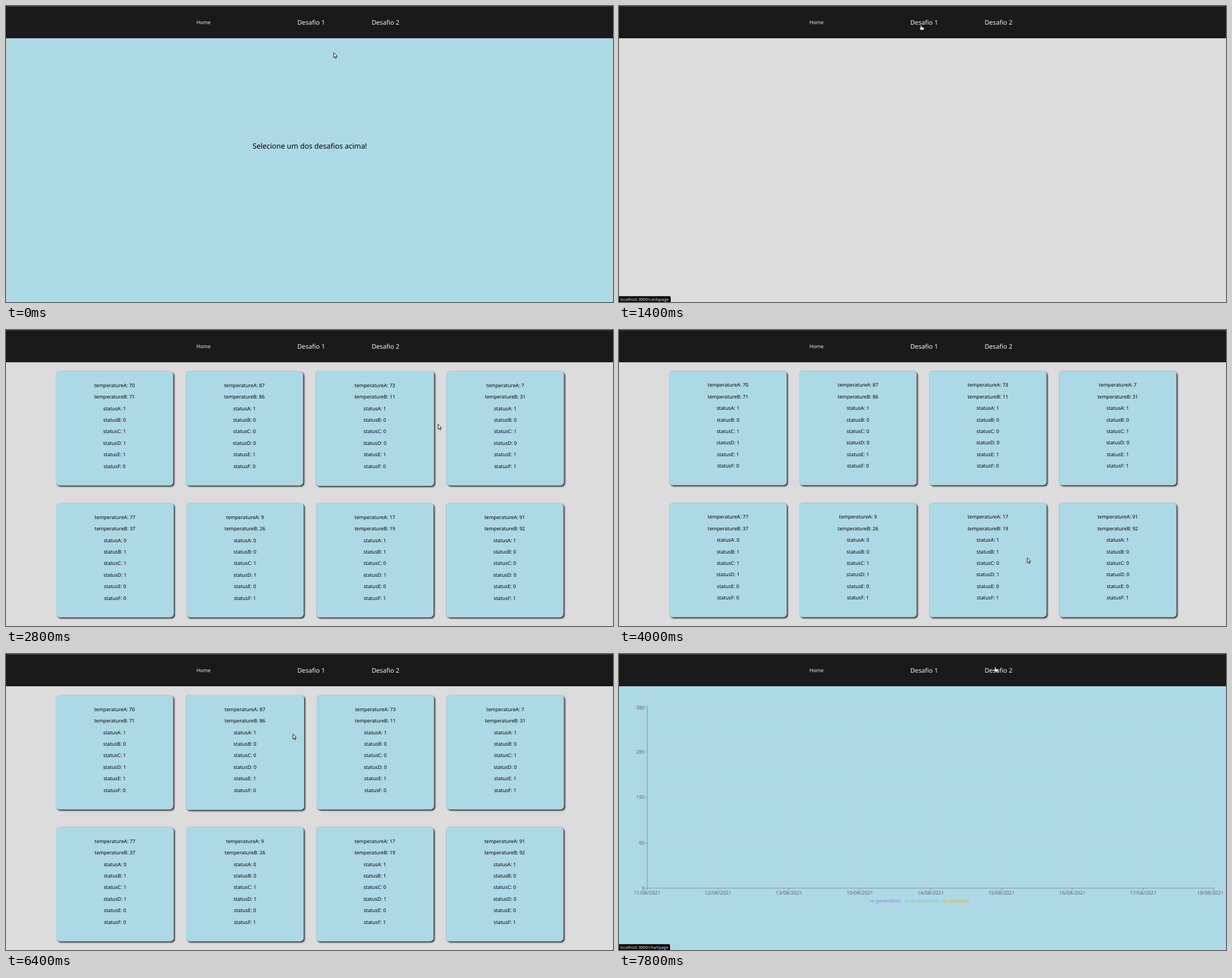
An HTML page that plays this animation: 1071 by 523 pixels, repeating every 8 s.

```html
<!DOCTYPE html>
<html lang="pt">
<head>
<meta charset="utf-8">
<title>Desafios</title>
<style>
  html, body { margin: 0; width: 100%; height: 100%; overflow: hidden; background: #add8e6; }
  svg { display: block; width: 100%; height: 100%; }
  text { font-family: "Noto Sans", "Open Sans", sans-serif; text-rendering: geometricPrecision; white-space: pre; }
  .mid { text-anchor: middle; }
  .end { text-anchor: end; }
  .nav { fill: #f4f4f4; }
  .card rect { fill: #add8e6; filter: drop-shadow(0 0 .5px rgba(0, 0, 0, .45)) drop-shadow(2px 2px 1.2px rgba(0, 0, 0, .75)); }
  .card text { font-size: 8.7px; }
  .tick { font-size: 8.83px; fill: #666; }
  .axis { stroke: #666; stroke-width: .6; fill: none; }
  .grid { stroke: #ccc; stroke-width: .5; stroke-dasharray: 1.7 1.7; opacity: .4; fill: none; }
  .legend { font-size: 8.6px; }
</style>
</head>
<body>
<svg id="stage" viewBox="0 0 1071 523"></svg>
<script>
const LOOP = 8000, STEP = 100, HOVER_LAG = 200;
const stage = document.getElementById('stage');

function add(parent, tag, attrs = {}, text) {
  const el = document.createElementNS('http://www.w3.org/2000/svg', tag);
  set(el, attrs);
  if (text !== undefined) el.textContent = text;
  parent.append(el);
  return el;
}
function set(el, attrs) { for (const k in attrs) el.setAttribute(k, attrs[k]); }
function show(el, on) { el.style.display = on ? '' : 'none'; }
const clamp = v => Math.max(0, Math.min(1, v));

const back = add(stage, 'rect', { width: 1071, height: 523 });

// Home page
const home = add(stage, 'text', { class: 'mid', x: 536, y: 251.6, 'font-size': 12.86 },
  'Selecione um dos desafios acima!');

// Cards page: two temperatures, then one flag per status A to F
const READINGS = [
  '70 71 101110', '87 86 100010', '73 11 100010', '7 31 101011',
  '77 37 011100', '9 26 001101', '17 19 110101', '91 92 100001'
];
const CARD_W = 207.2, CARD_H = 202, GROW_X = 1.8, GROW_Y = 1.6;
const cardPage = add(stage, 'g');
const cards = READINGS.map((reading, i) => {
  const g = add(cardPage, 'g', { class: 'card' });
  const box = add(g, 'rect', { rx: 6 });
  const [a, b, flags] = reading.split(' ');
  const lines = [`temperatureA: ${a}`, `temperatureB: ${b}`,
    ...[...flags].map((flag, k) => `status${'ABCDEF'[k]}: ${flag}`)];
  lines.forEach((line, k) => add(g, 'text', { class: 'mid', y: k * 20.42 - 73 }, line));
  return { g, box, col: i % 4, row: i >> 2, x: 192.4 + (i % 4) * 229.2, y: 173.3 + (i >> 2) * 233.1 };
});

// Chart page
const chartPage = add(stage, 'g');
const plot = add(chartPage, 'g');
const X0 = 49.8, X1 = 1050, Y0 = 92.8, Y1 = 413.8;
const DX = (X1 - X0) / 8, DY = (Y1 - Y0) / 4;
let gridPath = '', axisPath = `M${X0} ${Y0}V${Y1}H${X1}`;
[11, 12, 13, 10, 14, 15, 16, 17, 18].forEach((day, i) => {
  const x = X0 + i * DX;
  gridPath += `M${x} ${Y0}V${Y1}`;
  axisPath += `M${x} ${Y1}v3.4`;
  add(plot, 'text', { class: 'tick mid', x: Math.min(x, 1043.4), y: 424.6 }, `${day}/08/2021`);
});
for (let i = 0; i < 5; i++) {
  const y = Y1 - i * DY;
  gridPath += `M${X0} ${y}H${X1}`;
  axisPath += `M${X0} ${y}h-3.4`;
  add(plot, 'text', { class: 'tick end', x: 45.3, y: Math.max(y + 3, 97.6) }, i * 95);
}
add(plot, 'path', { class: 'grid', d: gridPath });
add(plot, 'path', { class: 'axis', d: axisPath });

function legend(name, x, color) {
  add(chartPage, 'path', {
    d: `M${x} 436.6h2.6a1.3 1.3 0 0 1 2.6 0h2.6m-2.6 0a1.3 1.3 0 0 1-2.6 0`,
    fill: 'none', stroke: color, 'stroke-width': 1
  });
  add(chartPage, 'text', { class: 'legend', x: x + 9.7, y: 439.2, fill: color }, name);
}
legend('generation', 443.4, '#8884d8');
legend('temperature', 504, '#82ca9d');
legend('consume', 571, '#ffa500');

// Navigation bar
add(stage, 'rect', { width: 1071, height: 57, fill: '#1a1a1a' });
add(stage, 'rect', { width: 1071, height: 1, fill: '#3c3c3c' });
function link(label, x, size) {
  add(stage, 'text', { class: 'nav mid', x, y: 28.5 + size * .36, 'font-size': size }, label);
}
link('Home', 348.5, 8.8);
link('Desafio 1', 538.4, 11.2);
link('Desafio 2', 669.6, 11.2);

// Link address bubble
const bubble = add(stage, 'g');
const bubbleBox = add(bubble, 'path');
const bubbleText = add(bubble, 'text', { x: 2, y: 520.7, 'font-size': 7.12, fill: '#fff' });

// Pointer
const pointer = add(stage, 'g', { stroke: '#000', 'stroke-linejoin': 'round' });
const arrow = add(pointer, 'path', {
  d: 'M.3.4V9.2L2.3 7.4 3.7 10.6 5.2 9.9 3.8 6.9H6.4Z', fill: '#fff', 'stroke-width': .9
});
const hand = add(pointer, 'path', {
  d: 'M-.9.6Q0-.6.9.6V3.2L4.3 3.9Q5.3 4.2 5.1 5.3L4.5 8.2H-.6L-2.9 5.2Q-2.7 4.2-.9 5Z',
  fill: '#fff', 'stroke-width': .4
});

// Stops of the pointer: time, x, y
const STOPS = [
  [100, 578, 82], [700, 533, 34], [1500, 533, 34], [2800, 762, 166], [3000, 830, 180],
  [3200, 830, 180], [3700, 766, 400], [3800, 766, 400], [4000, 720, 402], [4400, 720, 402],
  [5200, 270, 413], [5400, 288, 412], [6000, 270, 190], [6400, 506, 141], [7000, 664, 23]
];

function pointAt(t) {
  const next = STOPS.findIndex(s => s[0] > t);
  const b = STOPS.at(next), a = STOPS[next - 1] || b;
  const p = a === b ? 0 : clamp((t - a[0]) / (b[0] - a[0]));
  return [a[1] + (b[1] - a[1]) * p, a[2] + (b[2] - a[2]) * p];
}

// The hovered card grows, pushes its row sideways and nudges both rows
function layoutCards(t) {
  const [px, py] = pointAt(t - HOVER_LAG);
  const hot = cards.find(c => Math.abs(px - c.x) < CARD_W / 2 && Math.abs(py - c.y) < CARD_H / 2);
  const dy = hot ? (hot.row ? -1 : 1) * GROW_Y / 4 : 0;
  for (const c of cards) {
    const dx = hot && hot.row === c.row ? Math.sign(c.col - hot.col) * GROW_X / 2 : 0;
    const grow = c === hot ? 1 : 0;
    const w = CARD_W + GROW_X * grow, h = CARD_H + GROW_Y * grow;
    set(c.g, { transform: `translate(${c.x + dx} ${c.y + dy})` });
    set(c.box, { x: -w / 2, y: -h / 2, width: w, height: h });
  }
}

function drawBubble(t) {
  const late = t > 4000;
  const fadeIn = clamp((t - (late ? 6900 : 800)) / 200);
  const fadeOut = late ? 1 : clamp((2000 - t) / 200);
  set(bubble, { opacity: fadeIn * fadeOut });
  set(bubbleBox, { d: `M0 512.8H${late ? 88 : 89.2}q2 0 2 2V523H0Z` });
  bubbleText.textContent = 'localhost:3000/' + (late ? 'chartpage' : 'cardspage');
}

function draw(t) {
  const onCards = t >= 1400 && t < 7500;
  set(back, { fill: onCards ? '#dcdcdc' : '#add8e6' });
  show(home, t < 1400);
  show(cardPage, onCards && t >= 1600);
  show(chartPage, t >= 7500);
  show(plot, t >= 7800);
  layoutCards(t);
  drawBubble(t);
  const [x, y] = pointAt(t);
  set(pointer, { transform: `translate(${x} ${y})` });
  show(hand, y < 42);
  show(arrow, y >= 42);
}

const start = performance.now();
function frame() {
  const t = (performance.now() - start) % LOOP;
  draw(Math.floor(t / STEP) * STEP);
  requestAnimationFrame(frame);
}
frame();
</script>
</body>
</html>
```
